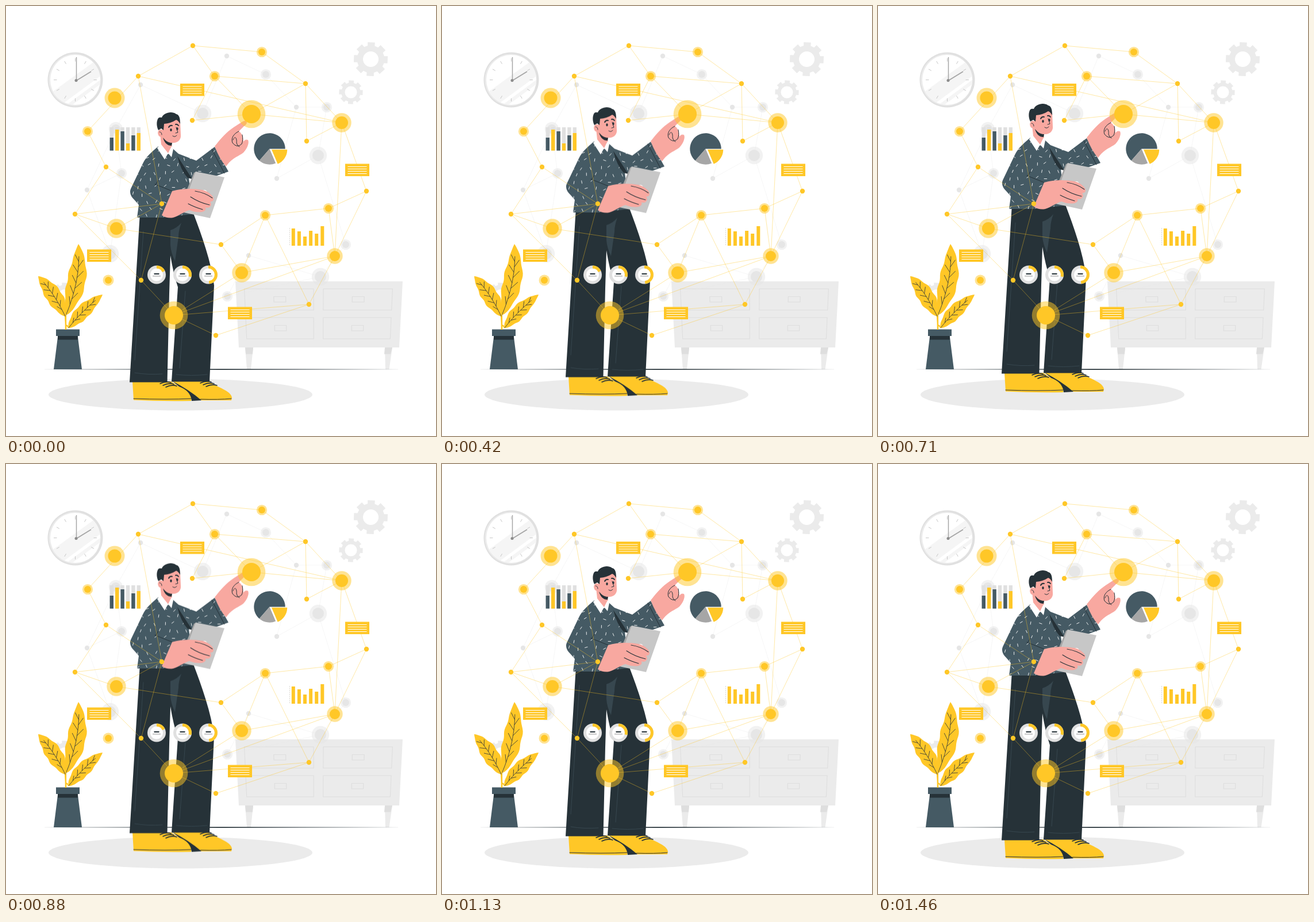
An HTML page that plays this animation: 748 by 748 pixels, repeating every 1500 ms.

```html
<!DOCTYPE html>
<html lang="en">
<head>
<meta charset="utf-8">
<title>Connected data</title>
<style>
  html, body { margin: 0; width: 100%; height: 100%; overflow: hidden; background: #fff; }
  svg { display: block; width: 100vw; height: 100vh; }
  #man { animation: float .75s steps(18, jump-none) -4ms infinite alternate; }
  @keyframes float { from { transform: translateY(0); } to { transform: translateY(-15px); } }
  .y { fill: #ffc727; }
  .d { fill: #263238; }
  .s { fill: #455a64; }
  .p { fill: #f8a8a0; }
  .g { fill: #ebebeb; }
  .w { fill: #fff; }
  .ink, .seam { fill: none; stroke: #263238; stroke-linecap: round; stroke-linejoin: round; }
  .seam { stroke: #37474f; }
</style>
</head>
<body>
<svg viewBox="0 0 748 748" xmlns="http://www.w3.org/2000/svg">
  <defs>
    <clipPath id="face"><circle cx="120.5" cy="128.5" r="43.5"/></clipPath>
    <path id="shirt" d="M265 244C252 255 243 263 238 274L217 318Q213 328 224 338L231 346L228 368L271 368L325 362L318 298L325 301L345 303L387 288L363 245L331 269L300 257L290 248L282 258Z"/>
    <clipPath id="cloth"><use href="#shirt"/></clipPath>
  </defs>

  <g id="gears" class="g"></g>

  <g id="clock">
    <circle cx="120.5" cy="128.5" r="48" fill="#e0e0e0"/>
    <circle cx="119.5" cy="128.5" r="45" class="g"/>
    <circle cx="120.5" cy="128.5" r="43.5" fill="#fff"/>
    <g clip-path="url(#face)" fill="#f5f5f5">
      <path d="M80 150L160 92L172 116L96 172Z"/>
      <path d="M104 173L170 124L172 130L110 176Z"/>
    </g>
    <g id="ticks" stroke="#c7c7c7"></g>
    <path d="M122.500 130V89" stroke="#a6a6a6" stroke-width="1.500"/>
    <path d="M122 130L148 114" stroke="#a6a6a6" stroke-width="2"/>
    <circle cx="122" cy="129.500" r="2.500" fill="#8c8c8c"/>
  </g>

  <g id="cabinet"></g>
  <g id="mesh"></g>

  <path class="d" d="M57 632L375 631.200L692 632L375 632.900Z"/>
  <ellipse class="g" cx="303.500" cy="676" rx="229.500" ry="27.500"/>

  <g id="plant">
    <path class="s" d="M90 576H125L132 632H83Z"/>
    <path class="d" d="M90 573H125V580.500H90Z"/>
    <path class="s" d="M87 562.500H128V574H87Z"/>
  </g>

  <g id="man">
    <path class="y" d="M220 653H287L301 662C313 667 323 673 323 681L322 687Q270 688 222 685.500Z"/>
    <path class="y" d="M290 653H352C369 664 391 669 393 681L392 686H332L310 668Z"/>
    <path class="d" d="M290 653L301 662Q321 669 323 687L340 686Q318 667 290 653Z"/>
    <path class="ink" d="M222 683Q280 685 322 683M338 684Q370 685 392 683"/>
    <g id="laces" class="ink" stroke-width="1.600"></g>

    <path class="d" d="M233 360L215 654.500H280.500L284 500L286 434Q291 465 299 489L288 653.500H354L362 486C357 445 341 400 325 358Z"/>
    <path fill="#37474f" d="M286 390Q298 386 305 377Q300 391 300 402L294 444Q287 430 286 416Z"/>
    <path class="seam" d="M239 392L224 616M224 638Q248 642 272 640M296 641Q322 644 350 641M312 496L302 630"/>

    <use class="s" href="#shirt"/>
    <g id="specks" clip-path="url(#cloth)" stroke="#fff" stroke-width=".9" stroke-linecap="round"></g>
    <path class="d" d="M298 261L324 301L316 299Q304 286 298 261Z"/>
    <path class="ink" d="M259 310L289 322M265 303L260 311M358 249L380 291"/>

    <path class="p" d="M268 222L270 241L282 257L289 247L288 234Z"/>
    <path class="d" d="M273 229Q280 237 289 238L288 243Q277 243 273 229Z"/>
    <path class="w" d="M269 240L282 256L276 267L263 247ZM288 244L282 256L288 263L291 249Z"/>

    <ellipse class="p" cx="269" cy="221" rx="4.800" ry="6.500"/>
    <path class="p" d="M273 205L271 222C274 233 282 239 291 238C300 238 305 231 304 224L303 201Q287 190 273 205Z"/>
    <path class="d" d="M265 216C261 208 262 199 265 195Q267 193 271 194C274 186 288 182 296 188C301 189 303 194 303 205C301 202 299 199 296 198Q287 204 275 205L274 216L270 213Z"/>
    <path class="ink" stroke-width=".9" d="M267 219Q271 219 271 224"/>
    <ellipse class="d" cx="287" cy="215.500" rx="1.700" ry="2.600"/>
    <ellipse class="d" cx="298" cy="213.500" rx="1.600" ry="2.500"/>
    <path class="ink" stroke-width="1.900" d="M283 211Q285 207 289 208M295 206Q298 205 300 208"/>
    <path class="ink" d="M296 211L299 220L295 221M290 226Q294 229 297 225"/>

    <path class="p" d="M363 244C374 230 384 219 396 211L410 202Q417 197 419 202Q419 206 414 209L405 218Q412 221 413 236Q416 231 421 233C424 239 418 250 413 255C404 262 393 264 383 279Q372 268 363 244Z"/>
    <path class="ink" d="M405 218C396 222 391 230 394 238Q402 248 410 240Q413 233 411 224M395 233C399 223 402 232 401 238Q402 243 406 245"/>

    <path fill="#a6a6a6" d="M327 290L331 288L311 359L299 357Z"/>
    <path fill="#c7c7c7" d="M330 288L380 298L355 369L304 358Z"/>
    <circle class="w" cx="345" cy="325" r="5"/>
    <path class="p" d="M289 322C305 317 326 317 342 320C353 323 362 331 361 337Q359 341 355 340Q359 346 354 350Q350 352 347 350Q349 356 342 358Q331 360 319 355C309 358 301 365 291 368Q280 370 271 364Z"/>
    <path class="ink" stroke-width="1.100" d="M329 322Q347 325 359 334M321 332Q336 342 354 346M317 344Q328 350 342 354"/>
  </g>

  <g id="web"></g>
  <g id="charts"></g>
</svg>
<script>
const YELLOW = '#ffc727', SLATE = '#455a64', INK = '#263238', PALE = '#e0e0e0', EDGE = '#dedede';
const { PI, sin, cos, hypot } = Math;
const rad = deg => deg * PI / 180;
const polar = (x, y, r, a) => `${(x + r * cos(a)).toFixed(2)} ${(y + r * sin(a)).toFixed(2)}`;
const put = (id, ...parts) => document.getElementById(id).insertAdjacentHTML('beforeend', parts.join(''));
const fill = (d, color) => `<path d="${d}" fill="${color}"/>`;
const line = (d, color, w = 1, extra = '') => `<path d="${d}" fill="none" stroke="${color}" stroke-width="${w}" ${extra}/>`;
const dot = (x, y, r, color, alpha = 1) => `<circle cx="${x}" cy="${y}" r="${r}" fill="${color}" opacity="${alpha}"/>`;
const bar = (x, y, w, h, color) => `<rect x="${x}" y="${y}" width="${w}" height="${h}" fill="${color}"/>`;
const times = (n, f) => Array.from({ length: n }, (_, i) => f(i));

function gear(x, y, r, hole) {
  const teeth = times(32, i => {
    const step = [-13.5, -11, 11, 13.5][i % 4];
    return polar(x, y, i % 4 % 3 ? r : r * .8, rad((i >> 2) * 45 + 2 + step * 1.1));
  });
  const arc = side => `a${hole} ${hole} 0 1 0 ${side * 2 * hole} 0`;
  return `<path fill-rule="evenodd" d="M${teeth.join('L')}ZM${x - hole} ${y}${arc(1)}${arc(-1)}Z"/>`;
}
put('gears', gear(634.5, 92.5, 30, 13.5), gear(600, 150, 21, 10.5), gear(101, 502, 21, 9));

put('ticks', ...times(12, i => line(`M${polar(120.5, 128.5, 32, rad(i * 30))}L${polar(120.5, 128.5, 37.5, rad(i * 30))}`, '#c7c7c7')));

// Cabinet: everything leans towards the centre line on the way down.
const lean = (x, y) => `${(x + (544.5 - x) * (y - 479) * .00036).toFixed(1)} ${y}`;
const box = (l, t, r, b) => `M${lean(l, t)}L${lean(r, t)}L${lean(r, b)}L${lean(l, b)}Z`;
[[416, 3], [672, -2]].forEach(([x, slant]) => {
  const w = slant > 0 ? 14 : -13;
  put('cabinet', fill(`M${x} 594h${w}l${-slant - 1} 38h${-w * .5}Z`, '#ebebeb'), fill(`M${x} 594h${w}l-1 11.500h${-w * .85}Z`, EDGE));
});
put('cabinet', fill(box(399, 479, 690, 594), '#ebebeb'));
for (const top of [492, 542]) {
  for (const left of [414, 552]) {
    const mid = left + 61;
    put('cabinet', line(box(left, top, left + 121, top + 37), EDGE, 1.1), line(box(mid - 10, top + 13.5, mid + 11, top + 23), EDGE, 1.2));
  }
}

// A leaf swells around a curved spine and carries short slanted veins.
function leaf(base, bend, tip, width) {
  const spine = t => [0, 1].map(k => (1 - t) ** 2 * base[k] + 2 * t * (1 - t) * bend[k] + t * t * tip[k]);
  const offset = (t, d) => {
    const [x, y] = spine(t), [u, v] = spine(t + .01), len = hypot(u - x, v - y);
    return [x - (v - y) / len * d, y + (u - x) / len * d].map(n => n.toFixed(1)).join(' ');
  };
  const girth = t => width * sin(PI * t ** .9) ** .8 * (1 + .07 * sin(t * 24));
  const side = s => times(31, i => offset(i / 30, s * girth(Math.min(i / 30, 1))));
  const veins = times(9, i => {
    const t = .15 + i * .075, s = i % 2 ? 1 : -1;
    return `M${offset(t, 0)}L${offset(t + .1, s * girth(t) * .6)}`;
  });
  const rib = times(16, i => offset(i * .055, 0)).join('L');
  put('plant', fill(`M${side(1).join('L')}L${side(-1).reverse().join('L')}Z`, YELLOW),
    line(`M${base}Q104 550 104 563`, YELLOW, 2.2), line(`M${rib}${veins.join('')}`, INK, .8));
}
leaf([104, 538], [131, 475], [126, 414], 16);
leaf([103, 540], [84, 499], [56, 470], 14);
leaf([109, 560], [132, 530], [168, 502], 12);

[[268, 657], [338, 656]].forEach(([x, y]) => {
  put('laces', ...times(3, i => `<path d="M${x + i * 5} ${y + i * 3}q10 -5 19 -2"/>`));
});

// Seeded flecks on a jittered grid, clipped to the cloth.
let seed = 11;
const rand = () => (seed = seed * 16807 % 2147483647) / 2147483647;
times(110, i => {
  const row = Math.floor(i / 11);
  const x = 217 + i % 11 * 16 + row % 2 * 8 + rand() * 5, y = 250 + row * 12.5 + rand() * 5, a = rand() * PI;
  put('specks', `<path d="M${polar(x, y, 2.3, a)}L${polar(x, y, 2.3, a + PI)}"/>`);
});

// Every node reaches for its two nearest neighbours; a rim and chords are optional.
const join = (a, b) => `M${a[0]} ${a[1]}L${b[0]} ${b[1]}`;
const gap = (a, b) => hypot(a[0] - b[0], a[1] - b[1]);
const near = (node, all) => all.filter(n => n !== node).sort((a, b) => gap(node, a) - gap(node, b)).slice(0, 2);
function network(id, rim, inner, chords, color, alpha) {
  const all = [...rim, ...inner], links = new Set();
  const link = (a, b) => links.add([a, b].sort((p, q) => all.indexOf(p) - all.indexOf(q)).map(n => all.indexOf(n)).join());
  rim.forEach((n, i) => link(n, rim[(i + 1) % rim.length]));
  inner.forEach(n => near(n, all).forEach(m => link(n, m)));
  chords.forEach(([a, b]) => link(all[a], all[b]));
  const d = [...links].map(key => join(...key.split(',').map(i => all[i]))).join('');
  put(id, line(d, color, .6, `opacity="${alpha}"`));
  all.forEach(([x, y, r = 4.2]) => put(id, r > 5 ? dot(x, y, r * 1.52, color, .5) : '', dot(x, y, r, color)));
}

network('mesh', [], [
  [384, 87], [452, 119, 6], [342, 187, 10], [505, 176], [558, 176, 6], [543, 260, 10],
  [471, 300], [201, 291, 6], [141, 320], [234, 137], [191, 214, 8], [181, 431, 10],
  [422, 434], [385, 505, 6], [547, 471, 10], [591, 415, 6]
], [], '#e6e6e6', .6);

network('web', [
  [230, 122], [325, 69], [445, 80, 6], [521, 135], [584, 203, 11], [627, 322], [572, 435, 9],
  [527, 519], [365, 573], [292, 538, 16], [235, 477], [120, 362], [174, 280], [142, 218, 6]
], [
  [427, 188, 16], [363, 122, 6], [324, 199], [523, 235], [561, 352, 6], [451, 364, 6],
  [374, 415], [410, 464, 11], [271, 344], [192, 387, 11]
], [
  [0, 4], [4, 14], [3, 14], [3, 15], [4, 6], [6, 9], [7, 9], [7, 19],
  [0, 22], [11, 22], [10, 22], [20, 23], [18, 19], [9, 21], [6, 21]
], YELLOW, .7);
put('web', dot(189, 160, 17.5, YELLOW, .5), dot(189, 160, 11.5, YELLOW), dot(178, 477, 9.5, YELLOW, .5), dot(178, 477, 6, YELLOW));

[[303, 135], [590, 274.5], [141, 423.5], [386, 523.5]].forEach(([x, y]) => {
  const rows = times(4, i => `M${x + 4.5} ${y + 5 + i * 4}h33`).join('');
  put('charts', bar(x, y, 42, 21.5, YELLOW), line(rows, '#fff'));
});

[22.5, 36.5, 33.5, 12.5, 26.5, 30.5].forEach((h, i) => {
  const x = 180.6 + i * 9.4;
  put('charts', bar(x, 211, 6.4, 40.5, PALE), bar(x, 251.5 - h, 6.4, h, i % 2 ? YELLOW : SLATE));
});
[30, 25, 16, 26, 21, 34].forEach((h, i) => put('charts', bar(496.8 + i * 10.1, 417 - h, 6, h, YELLOW)));
put('charts', line('M493.5 386V417', '#cfcfcf', .8, 'stroke-dasharray="2 1.5"'));

const arc = (x, y, r, from, to) =>
  `${polar(x, y, r, rad(from))}A${r} ${r} 0 ${+(to - from > 180)} 1 ${polar(x, y, r, rad(to))}`;
const slice = (x, y, from, to, color) => fill(`M${x} ${y}L${arc(x, y, 27.2, from, to)}Z`, color);
put('charts', slice(458.5, 248.5, 131, 360, SLATE), slice(458.5, 248.5, 67, 131, '#a6a6a6'), slice(462, 249.8, 0, 67, YELLOW));

[65, 105, 175].forEach((sweep, i) => {
  const x = 262 + i * 45, y = 467.5;
  put('charts', dot(x, y, 16, PALE), dot(x, y, 10.9, '#fff'),
    line(`M${arc(x, y, 13.4, -90, sweep - 90)}`, YELLOW, 5),
    bar(x - 4.5, 465, 9, 2, INK), bar(x - 7, 469.3, 14, 1, '#8c8c8c'));
});
</script>
</body>
</html>
```
